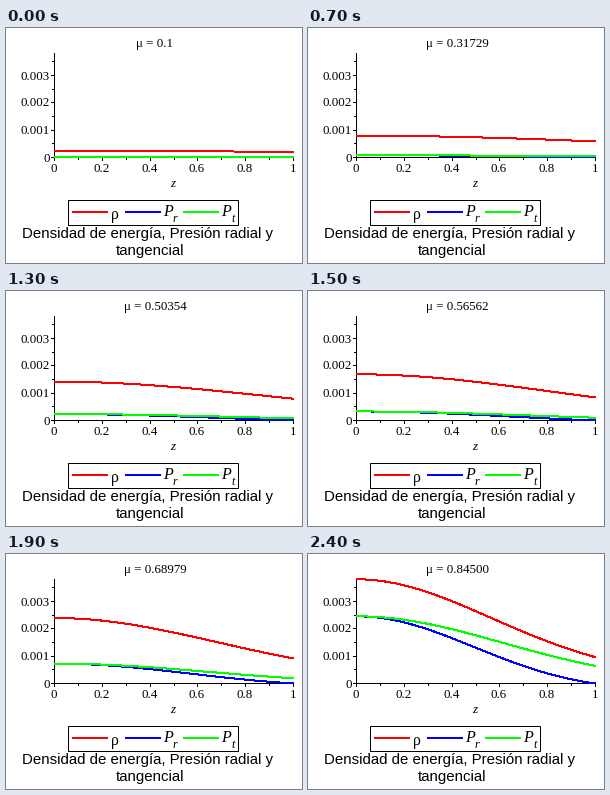
These frames come from a looping animation (296x235 px, 2500 ms). A matplotlib script:

```python
import numpy as np
import matplotlib.pyplot as plt
from matplotlib.animation import FuncAnimation
from matplotlib.patches import Rectangle

W, H, DPI = 296, 235, 100
PX = 72 / DPI
FRAMES = 25
MU_MIN, MU_MAX = 0.1, 0.845
X0, X1, Y0 = 48.5, 287.5, 129.5
Y_SCALE = 27400  # pixels per unit of density
RED, BLUE, GREEN = "#ff0000", "#0000ff", "#00ff00"

fig = plt.figure(figsize=(W / DPI, H / DPI), dpi=DPI, facecolor="white")
ax = fig.add_axes([0, 0, 1, 1])
ax.set(xlim=(0, W), ylim=(H, 0))
ax.axis("off")


def label(x, y, text, size=13, ha="center", font="Liberation Serif", **kw):
    return ax.text(x, y, text, fontsize=size * PX, ha=ha, va="baseline",
                   family=font, color="black", **kw)


def stroke(xs, ys, color="black", width=1, **kw):
    return ax.plot(xs, ys, color=color, lw=width * PX, snap=False,
                   solid_capstyle="butt", **kw)[0]


def to_x(z):
    return X0 + (X1 - X0) * z


def to_y(value):
    return Y0 - Y_SCALE * value


def draw_axes():
    stroke([X0 - 0.5, X1 + 0.5], [Y0, Y0])
    stroke([X0, X0], [25, Y0 + 0.5])
    for i in range(11):
        x = np.floor(to_x(i / 10)) + 0.5
        stroke([x, x], [Y0 + 0.5, Y0 + (2.5 if i % 2 else 3.5)])
        if i % 2 == 0:
            label(x - 0.5, 144, f"{i / 10:g}")
    for i in range(8):
        y = np.floor(to_y(i / 2000)) + 0.5
        stroke([X0 - (2.5 if i % 2 else 3.5), X0], [y, y])
        if i % 2 == 0:
            label(44, y + 4, f"{i / 2000:g}", ha="right")
    label(166.5, 159, "z", style="italic")


def draw_legend():
    ax.add_patch(Rectangle((62.5, 172.5), 170, 25, fill=False, ec="black",
                           lw=PX, snap=False))
    for x, color in ((66, RED), (119, BLUE), (177, GREEN)):
        stroke([x, x + 36], [184, 184], color, 2)
    label(104.5, 191, "ρ", 16, "left")
    for x, sub in ((157, "r"), (215, "t")):
        label(x, 188, "P", 16, "left", style="italic")
        label(x + 10, 194, sub, 12, "left", style="italic")


def profiles(mu, z):
    """Density, radial pressure and tangential pressure."""
    s = mu / MU_MAX
    k = mu * (0.75 + 0.45 * mu + 0.7 * mu**2)
    rho0 = mu * (0.0022 + 0.0009 * mu + 0.00154 * s**4.3)
    rho = rho0 * (1 + np.expm1(k / 8) * z**2) ** -8
    core = 0.00085 * mu**2 * (1 + 3.04 * s**6.6) * np.exp(-k * z**2)
    radial = core * (1 - z**2)
    tangential = radial + core * (0.6 + 0.44 * s**8) * z**2
    return rho, radial, tangential


draw_axes()
draw_legend()
for x, y, text in ((141.5, 210, "Densidad de energía, Presión radial y"),
                   (144, 227, "tangencial")):
    label(x, y, text, 15, font="Liberation Sans")

title = label(149, 19, "")
z = np.linspace(0, 1, 120)
window = Rectangle((48, 24), 240, 106, transform=ax.transData)
# Without antialiasing a one-pixel stroke fills two pixel rows.
curves = [stroke(to_x(z), z, color, antialiased=False, zorder=3)
          for color in (RED, BLUE, GREEN)]
for curve in curves:
    curve.set_clip_path(window)


def update(i):
    mu = MU_MIN + (MU_MAX - MU_MIN) * i / (FRAMES - 1)
    # The tiny offset rounds exact halves down.
    title.set_text("μ = 0.1" if i == 0 else f"μ = {mu - 1e-9:.5f}")
    for curve, values in zip(curves, profiles(mu, z)):
        curve.set_ydata(to_y(values))
    return [title, *curves]


anim = FuncAnimation(fig, update, frames=FRAMES, interval=100, repeat=True,
                     repeat_delay=0, blit=False)
plt.show()
```
